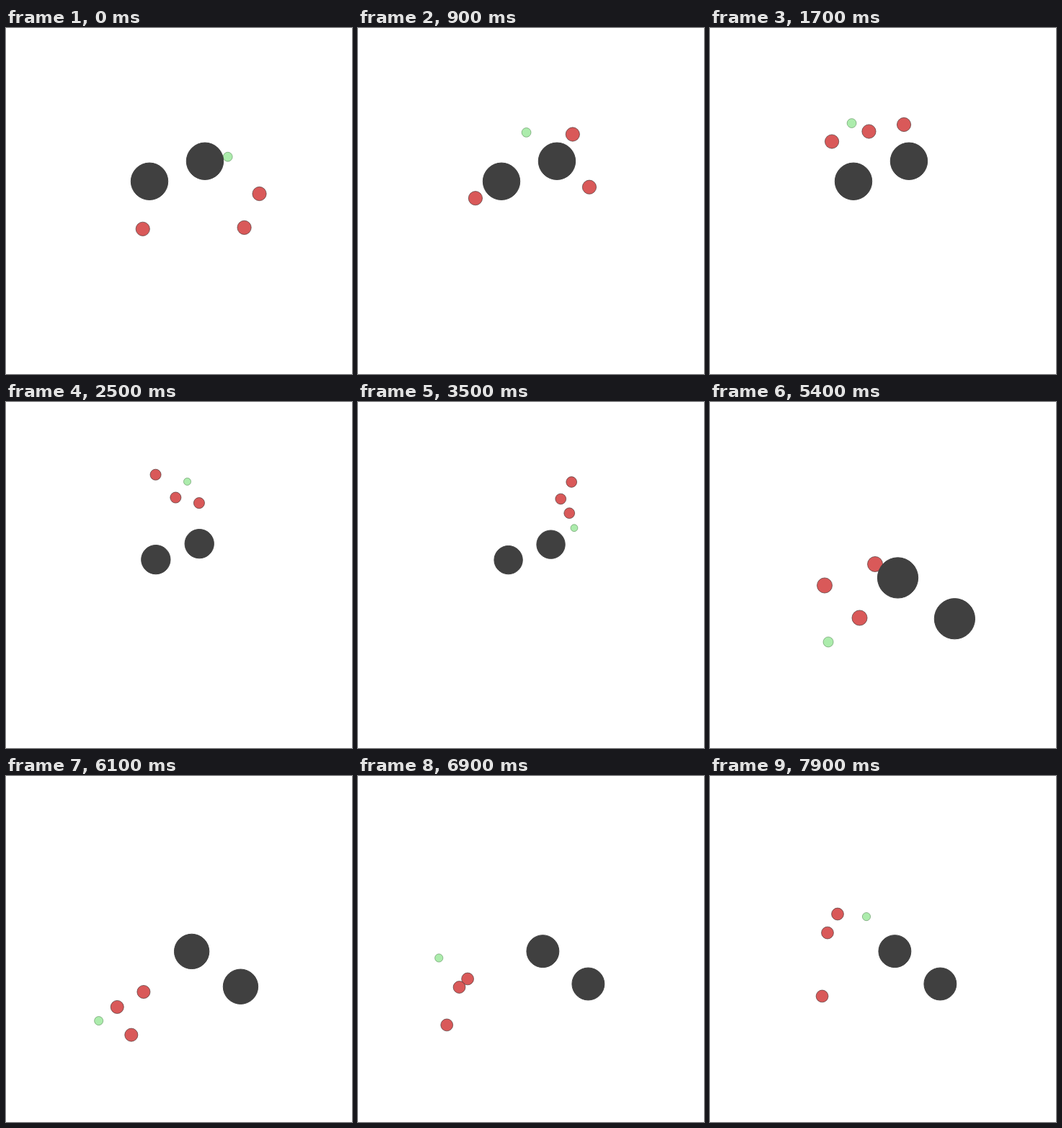
An HTML page with a canvas that plays this animation: 480x480 px, repeating every 8 s.

```html
<!DOCTYPE html>
<html lang="en">
<head>
<meta charset="utf-8">
<title>Pursuit</title>
<style>
  html, body { margin: 0; width: 100%; height: 100%; overflow: hidden; background: #fff; }
  canvas { display: block; width: 480px; height: 480px; }
</style>
</head>
<body>
<canvas id="stage" width="480" height="480"></canvas>
<script>
const ctx = document.getElementById("stage").getContext("2d");
const STEP = 100, HALF = 240;
const SQUASH = 0.015; // how far an agent may press into a rock

const RED = { size: 0.075, fill: "#d95959", line: "rgba(70,50,50,.65)" };
const GREEN = { size: 0.05, fill: "#acecac", line: "rgba(90,140,90,.6)" };
const ROCK = { size: 0.2, fill: "#404040", line: "#404040" };
const LOOKS = [RED, RED, RED, GREEN];

// Key poses by step: three hunters, then the prey, in world units with y down.
const episodes = [
  {
    start: 0, end: 50,
    rocks: [[-0.319, -0.212], [0.28, -0.43]],
    poses: {
      0: [[-0.391, 0.302], [0.868, -0.078], [0.705, 0.287], [0.527, -0.477]],
      9: [[-0.6, -0.03], [0.45, -0.72], [0.63, -0.15], [-0.05, -0.74]],
      17: [[-0.552, -0.642], [-0.152, -0.751], [0.226, -0.825], [-0.338, -0.84]],
      27: [[-0.229, -1.439], [0, -1.1], [0.3, -1], [0.24, -1.33]],
      35: [[0.571, -1.311], [0.419, -1.072], [0.541, -0.872], [0.609, -0.663]],
      47: [[0.711, -0.213], [0.625, 0.074], [0.518, 0.246], [0.213, 0.528]]
    }
  },
  {
    start: 50, end: 80,
    rocks: [[0.146, 0.028], [0.707, 0.432]],
    poses: {
      54: [[-0.078, -0.107], [-0.576, 0.103], [-0.231, 0.423], [-0.54, 0.661]],
      63: [[-0.5, 0.55], [-0.75, 0.72], [-0.65, 1.04], [-1, 0.84]],
      69: [[-0.783, 0.369], [-0.886, 0.472], [-1.04, 0.939], [-1.138, 0.111]],
      79: [[-0.561, -0.432], [-0.686, -0.2], [-0.752, 0.583], [-0.205, -0.4]]
    }
  }
];

// Monotone cubic through the keys: turning points fall exactly on a key.
function ease(times, values, t) {
  const last = times.length - 1;
  const rise = i => (values[i + 1] - values[i]) / (times[i + 1] - times[i]);
  const slope = i => {
    if (i === 0) return rise(0);
    if (i === last) return rise(last - 1);
    const a = rise(i - 1), b = rise(i);
    return a * b > 0 ? 2 * a * b / (a + b) : 0;
  };
  if (t <= times[0]) return values[0] + slope(0) * (t - times[0]);
  if (t >= times[last]) return values[last] + slope(last) * (t - times[last]);
  const i = times.findIndex(k => k > t) - 1;
  const span = times[i + 1] - times[i];
  const u = (t - times[i]) / span, v = 1 - u;
  return v * v * (1 + 2 * u) * values[i] + u * u * (3 - 2 * u) * values[i + 1]
    + span * u * v * (v * slope(i) - u * slope(i + 1));
}

// Rocks are solid: an agent inside one slides out to its rim.
function pushOut([x, y], size, rocks) {
  for (const [rx, ry] of rocks) {
    const gap = Math.hypot(x - rx, y - ry);
    const grow = Math.max(1, (ROCK.size + size - SQUASH) / gap);
    x = rx + (x - rx) * grow;
    y = ry + (y - ry) * grow;
  }
  return [x, y];
}

// The view widens to the farthest coordinate reached so far in an episode.
const scenes = [];
for (const { start, end, rocks, poses } of episodes) {
  const times = Object.keys(poses).map(Number);
  let reach = 0;
  for (let t = start; t < end; t++) {
    const agents = LOOKS.map((look, n) => {
      const coord = axis => ease(times, times.map(k => poses[k][n][axis]), t);
      return pushOut([coord(0), coord(1)], look.size, rocks);
    });
    reach = Math.max(reach, ...[...rocks, ...agents].flat().map(Math.abs));
    scenes.push({ agents, rocks, scale: HALF / (1 + reach) });
  }
}

function disc([x, y], look, scale) {
  ctx.beginPath();
  ctx.arc(HALF + x * scale, HALF + y * scale, look.size * scale, 0, 2 * Math.PI);
  ctx.fillStyle = look.fill;
  ctx.strokeStyle = look.line;
  ctx.fill();
  ctx.stroke();
}

function draw(now) {
  const { agents, rocks, scale } = scenes[Math.floor(now / STEP) % scenes.length];
  ctx.fillStyle = "#fff";
  ctx.fillRect(0, 0, 480, 480);
  agents.forEach((p, n) => disc(p, LOOKS[n], scale));
  rocks.forEach(p => disc(p, ROCK, scale));
}

const begin = performance.now();
function tick() {
  draw(performance.now() - begin);
  requestAnimationFrame(tick);
}
tick();
</script>
</body>
</html>
```
